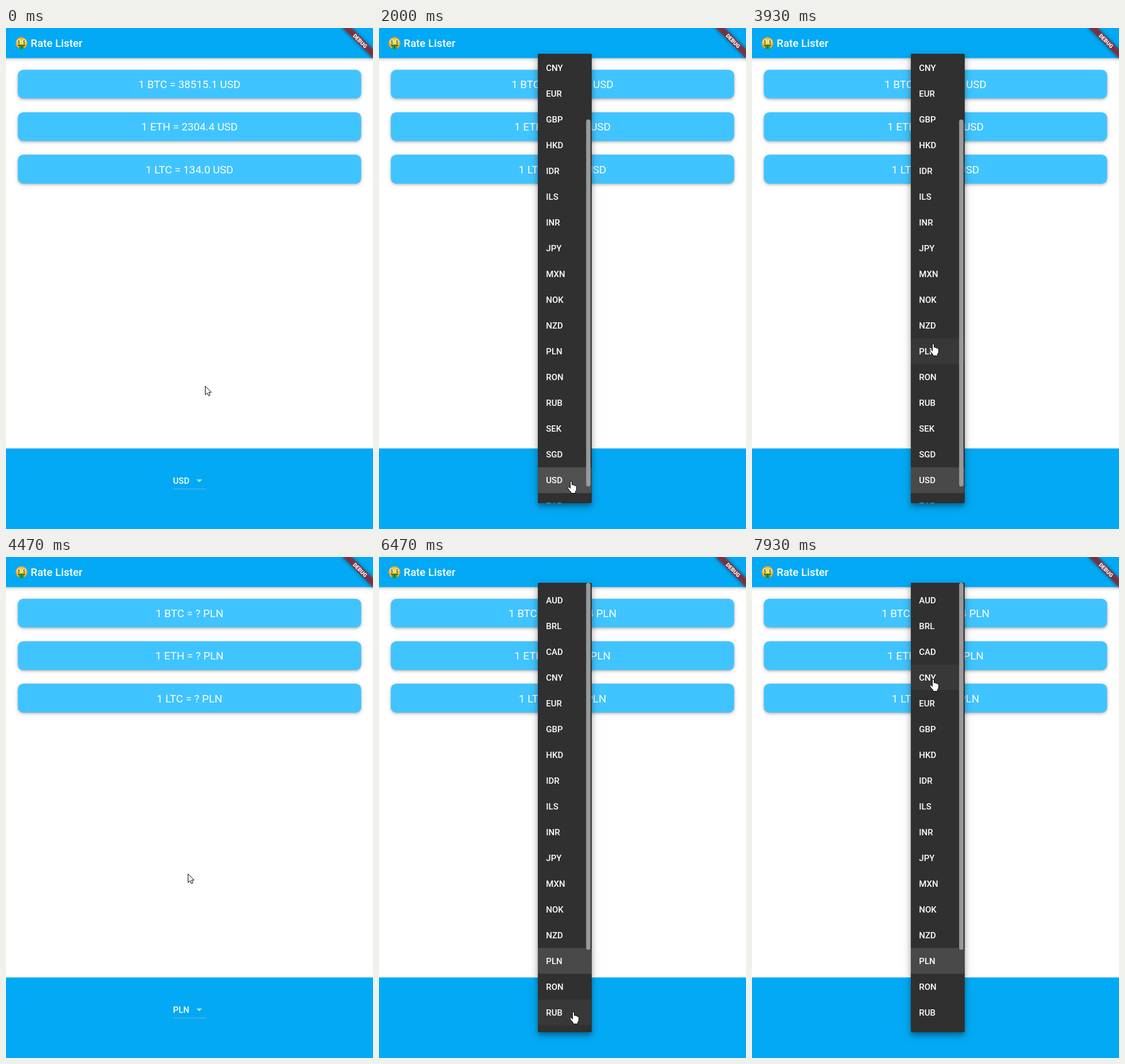
Animation of 640x875 px, one loop 8 s. Source, as an HTML page with a canvas:

```html
<!DOCTYPE html>
<html lang="en">
<head>
<meta charset="utf-8">
<title>Rate Lister</title>
<style>
  html, body { margin: 0; width: 100%; height: 100%; overflow: hidden; background: #fff; }
  canvas { display: block; }
</style>
</head>
<body>
<canvas id="stage" width="640" height="875"></canvas>
<script>
const ctx = document.getElementById('stage').getContext('2d');
const LOOP = 8000, FPS = 15;
const BLUE = '#03a9f4', CARD = '#40c4ff', MENU = '#303030';
const ROW = 45;
const CODES = ('AUD BRL CAD CNY EUR GBP HKD IDR ILS INR JPY MXN NOK NZD ' +
  'PLN RON RUB SEK SGD USD ZAR').split(' ');
const COINS = ['BTC', 'ETH', 'LTC'];
const PRICES = { USD: ['38515.1', '2304.4', '134.0'], PLN: ['150049.4', '8967.0', '522.2'] };

// Steps at which the state changes
const HAND_ON = 23, OPEN_1 = 30, CHOSEN = 67, LOADED = 74, OPEN_2 = 97;

// Pointer path: [step, x, y] of the hot spot
const PATH = [
  [0, 347, 625], [4, 355, 690], [10, 335, 789], [15, 335, 789], [16, 334, 790],
  [22, 334, 790], [23, 333.5, 790.5], [41, 333.5, 790.5], [46, 316, 691], [54, 316, 572],
  [59, 315, 551], [62, 315, 551], [64, 317, 552], [66, 317, 552], [67, 317, 553],
  [70, 317, 553], [78, 382, 754], [80, 382, 754], [86, 350, 803], [90, 338, 794],
  [96, 338, 794], [97, 338, 794], [107, 316, 375], [109, 316, 363], [114, 311, 285],
  [119, 315, 213], [120, 315, 213]
];

const arrowShape = new Path2D('M.5 .5V15.6L4 12.3L6.3 17.4L8.8 16.3L6.6 11.3H11Z');
const handShape = new Path2D('M-.5 13V2Q-.3 .5 1 .5Q2.4 .5 2.5 2V6.8Q4.3 6 5.4 7.5' +
  'Q7.2 6.8 8.1 8.4Q10.4 8 10.4 10.3V14.5Q10.4 16.5 8.6 18.6V21.5H.6V19.2' +
  'Q-2.2 16.6-4.7 12.8Q-5.4 11.2-4 10.6Q-2.8 10.3-1.6 12Z');

// Monotone cubic through the path points
function pointer(step) {
  let i = 0;
  while (i < PATH.length - 2 && PATH[i + 1][0] <= step) i++;
  const a = PATH[i], b = PATH[i + 1], h = b[0] - a[0], u = (step - a[0]) / h;
  const slope = (k, axis) => k < 0 || k > PATH.length - 2 ? 0 :
    (PATH[k + 1][axis] - PATH[k][axis]) / (PATH[k + 1][0] - PATH[k][0]);
  const tangent = (k, axis) => {
    const p = slope(k - 1, axis), q = slope(k, axis);
    return p * q > 0 ? 2 * p * q / (p + q) : 0;
  };
  return [1, 2].map(axis => {
    const m = tangent(i, axis), n = tangent(i + 1, axis), v = 1 - u;
    return a[axis] * (1 + 2 * u) * v * v + b[axis] * u * u * (3 - 2 * u) +
      h * u * v * (m * v - n * u);
  });
}

function rect(x, y, w, h, color) {
  ctx.fillStyle = color;
  ctx.fillRect(x, y, w, h);
}

function rounded(x, y, w, h, r, color) {
  ctx.fillStyle = color;
  ctx.beginPath();
  ctx.roundRect(x, y, w, h, r);
  ctx.fill();
}

function text(str, x, y, size, weight = 400, align = 'left') {
  ctx.font = `${weight} ${size}px Roboto, sans-serif`;
  ctx.textAlign = align;
  ctx.fillStyle = '#fff';
  ctx.fillText(str, x, y);
}

// Runs draw once per [offset, blur, alpha] shadow layer
function shadowed(layers, draw) {
  ctx.save();
  for (const [dy, blur, alpha] of layers) {
    ctx.shadowColor = `rgba(0,0,0,${alpha})`;
    ctx.shadowOffsetY = dy;
    ctx.shadowBlur = blur;
    draw();
  }
  ctx.restore();
}

function disc(x, y, r, color) {
  ctx.fillStyle = color;
  ctx.beginPath();
  ctx.arc(x, y, r, 0, 7);
  ctx.fill();
}

function face(x, y) {
  const glow = ctx.createRadialGradient(x, y, 2, x, y, 10.5);
  glow.addColorStop(0, '#fde030');
  glow.addColorStop(.6, '#fbc72b');
  glow.addColorStop(1, '#f2982a');
  disc(x, y, 10.3, glow);
  ctx.textAlign = 'center';
  ctx.font = 'bold 8px Roboto, sans-serif';
  for (const dx of [-4.6, 4.6]) {
    disc(x + dx, y - 2.5, 3.5, '#f5f2cf');
    ctx.fillStyle = '#3d5a27';
    ctx.fillText('$', x + dx, y + .4);
  }
  ctx.fillStyle = '#422b0d';
  ctx.beginPath();
  ctx.ellipse(x, y + 3, 6.5, 3.4, 0, 0, Math.PI);
  ctx.fill();
  rounded(x - 4.2, y + 3.6, 8.4, 7.4, [0, 0, 3, 3], '#2e9b47');
  rect(x - .7, y + 4.5, 1.4, 5, '#17652b');
}

function appBar() {
  shadowed([[2, 5, .2], [1, 8, .13]], () => rect(-10, 0, 660, 52.3, BLUE));
  face(27, 26.3);
  text('Rate Lister', 43, 33, 18.75, 500);
}

function cards(step) {
  const code = step < CHOSEN ? 'USD' : 'PLN';
  COINS.forEach((coin, i) => {
    const y = 73.2 + i * 74.2;
    const price = step >= CHOSEN && step < LOADED ? '?' : PRICES[code][i];
    shadowed([[2, 4, .22], [1, 7, .13]], () => rounded(20.8, y, 598.4, 49.8, 9.4, CARD));
    text(`1 ${coin} = ${price} ${code}`, 320, y + 32, 18.75, 400, 'center');
  });
}

function picker(step) {
  rect(0, 734.3, 640, 141, BLUE);
  text(step < CHOSEN ? 'USD' : 'PLN', 291.3, 796, 15, 500);
  ctx.fillStyle = 'rgba(255,255,255,.7)';
  ctx.beginPath();
  ctx.moveTo(332, 788.4);
  ctx.lineTo(342, 788.4);
  ctx.lineTo(337, 793.2);
  ctx.fill();
  rect(291, 804.5, 58, 1, 'rgba(189,189,189,.65)');
}

function menu(step) {
  const first = step < CHOSEN;
  const scroll = first ? 140.5 : 0;
  const selected = CODES.indexOf(first ? 'USD' : 'PLN');
  const x = 277, y = 45, w = 93.7, h = 784.5;
  const top = i => y + 7.8 + i * ROW - scroll;
  const hoveredAt = s => Math.floor((pointer(s)[1] - top(0)) / ROW);
  shadowed([[5, 7, .2], [7, 12, .16], [3, 16, .12]], () => rounded(x, y, w, h, 2, MENU));
  ctx.save();
  ctx.beginPath();
  ctx.roundRect(x, y, w, h, 2);
  ctx.clip();
  rect(x, top(selected), w, ROW, 'rgba(255,255,255,.12)');
  const start = first ? OPEN_1 : OPEN_2;
  rect(x, top(hoveredAt(step)), w, ROW, 'rgba(255,255,255,.012)');
  rect(x, top(hoveredAt(Math.max(start, step - 1))), w, ROW, 'rgba(255,255,255,.028)');
  CODES.forEach((code, i) => text(code, 291.3, top(i) + 28, 15, 500));
  rounded(361.2, y + scroll * .817, 7.6, 641, 3.8, '#999');
  ctx.restore();
}

function banner() {
  ctx.save();
  ctx.translate(640, 0);
  ctx.rotate(Math.PI / 4);
  ctx.filter = 'blur(3px)';
  rect(-37.5, 26.2, 75, 11.3, 'rgba(0,0,0,.5)');
  ctx.filter = 'none';
  rect(-37.5, 26.2, 75, 11.3, 'rgba(183,28,28,.627)');
  text('DEBUG', 0, 35.3, 9.56, 900, 'center');
  ctx.restore();
}

function cursor(step) {
  const hand = step >= OPEN_2 || step >= HAND_ON && step < CHOSEN;
  const [x, y] = pointer(step);
  const shape = hand ? handShape : arrowShape;
  ctx.save();
  ctx.translate(Math.round(x), Math.round(y));
  ctx.fillStyle = '#fff';
  ctx.strokeStyle = '#000';
  ctx.lineWidth = 1;
  ctx.lineJoin = 'round';
  ctx.fill(shape);
  ctx.stroke(shape);
  ctx.restore();
}

function draw(time) {
  const step = Math.floor((time % LOOP + 3.4) * FPS / 1000) % (LOOP * FPS / 1000);
  rect(0, 0, 640, 875, '#fff');
  appBar();
  cards(step);
  picker(step);
  if (step >= OPEN_2 || step >= OPEN_1 && step < CHOSEN) menu(step);
  banner();
  cursor(step);
}

const began = performance.now();
function tick() {
  draw(performance.now() - began);
  requestAnimationFrame(tick);
}
tick();
</script>
</body>
</html>
```
